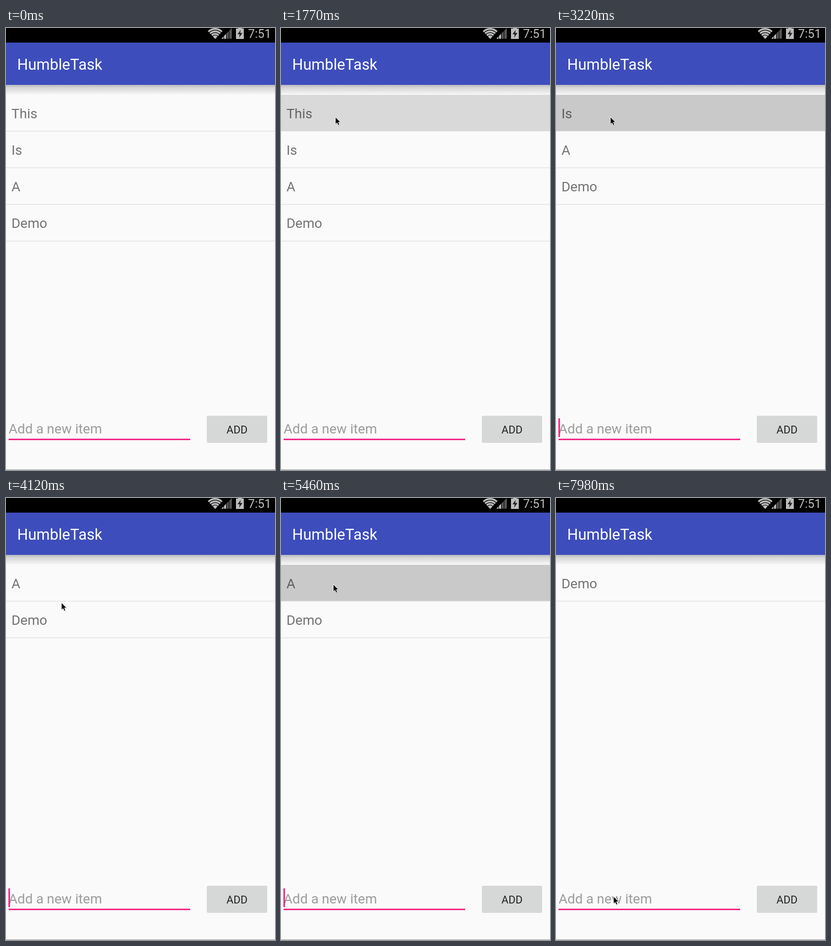
These frames come from a looping animation (517 by 847 pixels, 8000 ms). An HTML page:

```html
<!DOCTYPE html>
<html lang="en">
<head>
<meta charset="utf-8">
<title>To-do list</title>
<style>
  html, body { margin: 0; width: 100%; height: 100%; overflow: hidden; background: #fafafa; }
  svg { display: block; font-family: Roboto, sans-serif; }
  .item { font-size: 26.1px; fill: #000; fill-opacity: .54; }
</style>
</head>
<body>
<svg width="517" height="847" viewBox="0 0 517 847">
  <defs>
    <linearGradient id="fade" x2="0" y2="1">
      <stop stop-color="#b9b9bd"/>
      <stop offset=".3" stop-color="#d6d6d6"/>
      <stop offset="1" stop-color="#f5f5f5"/>
    </linearGradient>
    <clipPath id="fan"><path d="M402 21 L382.5 0 V-9 H421.5 V0Z"/></clipPath>
  </defs>
  <rect width="517" height="847" fill="#fafafa"/>

  <!-- Status bar -->
  <rect width="517" height="28" fill="#000"/>
  <g clip-path="url(#fan)" fill="none" stroke="#bdbdbd" stroke-width="3.4">
    <circle cx="402" cy="20.5" r="18.8"/>
    <circle cx="402" cy="20.5" r="14"/>
    <circle cx="402" cy="20.5" r="9.2"/>
    <circle cx="402" cy="20.5" r="3.2" stroke-width="6.4"/>
  </g>
  <path d="M414 20.5 L434 0 V20.5Z" fill="#565656"/>
  <path d="M414 20.5 L423 11.3 V20.5Z" fill="#bdbdbd"/>
  <path d="M418.5 10v11M423.5 5v16M428.7 0v21" stroke="#000"/>
  <path d="M442 1h4v-2h7v2h4v20h-15z" fill="#bdbdbd"/>
  <path d="M451 3.5 L445 12h4l-1 6.5 6.5-9h-4.3z" fill="#222"/>
  <text x="465.3" y="19" font-size="23" fill="#bdbdbd">7:51</text>

  <!-- App bar -->
  <rect y="109" width="517" height="18" fill="url(#fade)"/>
  <rect y="28" width="517" height="81" fill="#3d4dbc"/>
  <text x="21.5" y="79.5" font-size="29.3" fill="#fff">HumbleTask</text>

  <!-- List -->
  <rect id="press" y="128" width="517" height="69.5"/>
  <g id="list"></g>

  <!-- Entry field -->
  <text x="5" y="776.7" font-size="26.1" fill="#9c9c9c">Add a new item</text>
  <rect x="5" y="787" width="349" height="2.7" fill="#f31a7f"/>
  <rect id="caret" x="4.7" y="748" width="2.9" height="36" fill="#f31a7f"/>
  <rect x="386" y="743" width="116" height="52" rx="2.5" fill="#d6d7d7"/>
  <text x="444" y="776.5" font-size="20.5" fill="#1f1f1f" text-anchor="middle">ADD</text>
  <rect y="846" width="517" height="1" fill="#999"/>

  <g id="mouse">
    <path d="M1 2v14l3.2-2.9 2.2 4.9 2.5-1.1-2-4.6h4.4z" opacity=".15"/>
    <path d="M.5 .5v14l3.2-2.9 2.1 4.8 2.6-1.1-2.1-4.6h4.2z" stroke="#fff" stroke-width=".9"/>
  </g>
</svg>
<script>
const LOOP = 8000;
const REFRESH = 147;   // the screen is redrawn in steps of this many ms
const LEAD = 25;
const ROW = 70.25;
const HOLD = 520;      // a press this long removes the top row
const PRESSES = [1670, 3000, 5200];
const $ = id => document.getElementById(id);

// Places where the pointer rests or turns.
const STOPS = [
  { t: 585, x: 332, y: 71 },
  { t: 1320, x: 104, y: 170 },
  { t: 4000, x: 104, y: 170 },
  { t: 4116, x: 106, y: 200 },
  { t: 4860, x: 100, y: 165 },
  { t: 6100, x: 100, y: 165 },
  { t: 6330, x: 122, y: 153 },
  { t: 6760, x: 136, y: 377 },
  { t: 7000, x: 136, y: 377 },
  { t: 7790, x: 109, y: 777 },
  { t: 7930, x: 110, y: 763 }
];

const smooth = k => k * k * (3 - 2 * k);
const show = (element, visible) => element.style.display = visible ? "" : "none";

function pointerAt(t) {
  const next = STOPS.findIndex(stop => stop.t > t);
  const to = STOPS.at(next);
  const from = next < 0 ? to : STOPS[next - 1];
  const k = next < 0 ? 1 : smooth((t - from.t) / (to.t - from.t));
  return `${from.x + (to.x - from.x) * k} ${from.y + (to.y - from.y) * k}`;
}

$("list").innerHTML = ["This", "Is", "A", "Demo"].map(word =>
  `<g><text class="item" x="10.5" y="172.6">${word}</text>
   <rect y="197" width="517" height="1.2" fill="#dedede"/></g>`).join("");
const rows = [...$("list").children];

function draw(time) {
  const t = Math.floor((time + LEAD) / REFRESH) * REFRESH;

  const removed = PRESSES.filter(start => t >= start + HOLD).length;
  rows.forEach((row, i) => {
    show(row, i >= removed);
    row.setAttribute("transform", `translate(0 ${(i - removed) * ROW})`);
  });

  const held = t - PRESSES[removed];
  $("press").setAttribute("opacity", held >= 0 ? Math.min(.197, .09 + held * .00045) : 0);

  show($("caret"), t >= 110 && (t - 110) % 1000 < 500);

  const entered = t >= STOPS[0].t;
  show($("mouse"), entered);
  if (entered) $("mouse").setAttribute("transform", `translate(${pointerAt(t)})`);
}

const start = performance.now();
(function frame() {
  draw((performance.now() - start) % LOOP);
  requestAnimationFrame(frame);
})();
</script>
</body>
</html>
```
